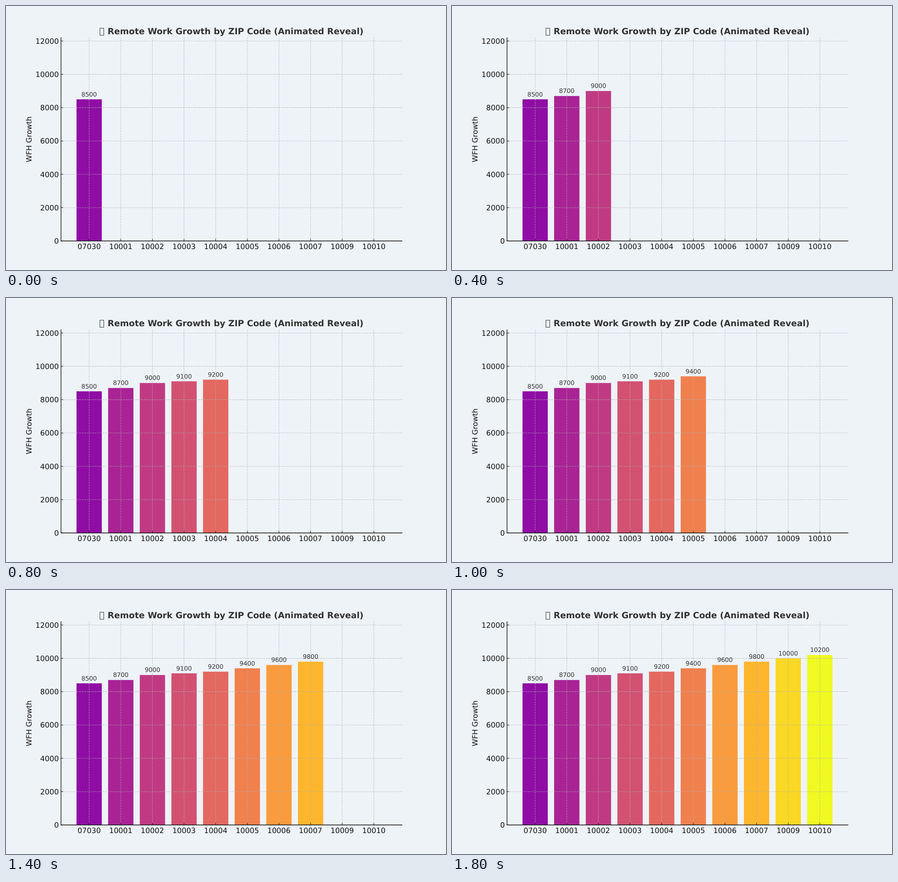
Write an HTML page that moves like this. It is 966 px wide and 580 px high and loops after 4000 ms.

```html
<!DOCTYPE html>
<html lang="en">
<head>
<meta charset="utf-8">
<title>Remote Work Growth</title>
<style>
html, body { margin: 0; width: 100%; height: 100%; overflow: hidden; background: #eef3f8; }
svg { display: block; font: 16.1px "DejaVu Sans", sans-serif; text-rendering: geometricPrecision; }
text { fill: #111; text-anchor: middle; }
.end { text-anchor: end; }
.title { font-size: 18.78px; font-weight: bold; fill: #333; }
.value { font-size: 13.42px; fill: #333; }
.grid { stroke: #b0b0b0; stroke-opacity: .7; stroke-width: 1.07; stroke-dasharray: 3.97 1.72; }
.tick { stroke: #111; stroke-width: 1.07; }
.axis { stroke: #111; stroke-width: 1.35; stroke-linecap: square; }
.box { fill: none; stroke: #333; stroke-width: 1.05; }
</style>
</head>
<body>
<svg id="chart" width="966" height="580" viewBox="0 0 966 580"></svg>
<script>
const bars = [
  ["07030", 8500, "#8f0da4"], ["10001", 8700, "#a92395"],
  ["10002", 9000, "#c03a83"], ["10003", 9100, "#d25171"],
  ["10004", 9200, "#e3685f"], ["10005", 9400, "#f0804e"],
  ["10006", 9600, "#fa9b3d"], ["10007", 9800, "#fdb62d"],
  ["10009", 10000, "#fad824"], ["10010", 10200, "#f0f921"]
];
const LEFT = 120.75, RIGHT = 869.4, TOP = 69.6, BOTTOM = 516.2;
const STEP = 200, LOOP = 4000;
const unit = (RIGHT - LEFT) / 10.78;
const xOf = i => LEFT + (i + 0.89) * unit;
const yOf = v => BOTTOM - v / 12200 * (BOTTOM - TOP);
const chart = document.getElementById("chart");

function add(tag, attrs, text = "") {
  const el = document.createElementNS("http://www.w3.org/2000/svg", tag);
  for (const key in attrs) el.setAttribute(key, attrs[key]);
  el.textContent = text;
  return chart.appendChild(el);
}
const line = (cls, x1, y1, x2, y2) => add("line", { class: cls, x1, y1, x2, y2 });
const label = (cls, x, y, text) => add("text", { class: cls, x, y }, text);

const rects = bars.map(([, value, fill], i) => add("rect", {
  x: xOf(i) - 0.4 * unit, y: yOf(value), width: 0.8 * unit, height: BOTTOM - yOf(value), fill
}));

bars.forEach(([zip], i) => {
  const x = xOf(i);
  line("grid", x, BOTTOM, x, TOP);
  line("tick", x, BOTTOM, x, BOTTOM - 4.7);
  label("", x, 533.6, zip);
});
for (let v = 0; v <= 12000; v += 2000) {
  const y = yOf(v);
  line("grid", LEFT, y, RIGHT, y);
  line("tick", LEFT, y, LEFT + 4.7, y);
  label("end", 116.05, y + 5.9, v);
}
line("axis", LEFT, TOP, LEFT, BOTTOM);
line("axis", LEFT, BOTTOM, RIGHT, BOTTOM);

const values = bars.map(([, value], i) => label("value", xOf(i), yOf(value) - 6.5, value));

// Empty box standing for a missing glyph
add("rect", { class: "box", x: 206.2, y: 48.8, width: 8.4, height: 15.5 });
label("title", 504, 61.5, "Remote Work Growth by ZIP Code (Animated Reveal)");
add("text", { transform: "translate(55.8 292.9) rotate(-90)" }, "WFH Growth");

const start = performance.now();
function draw(now) {
  const t = Math.max(0, now - start) % LOOP;
  bars.forEach((_, i) => {
    const shown = t >= i * STEP ? "visible" : "hidden";
    rects[i].setAttribute("visibility", shown);
    values[i].setAttribute("visibility", shown);
  });
  requestAnimationFrame(draw);
}
draw(start);
</script>
</body>
</html>
```
